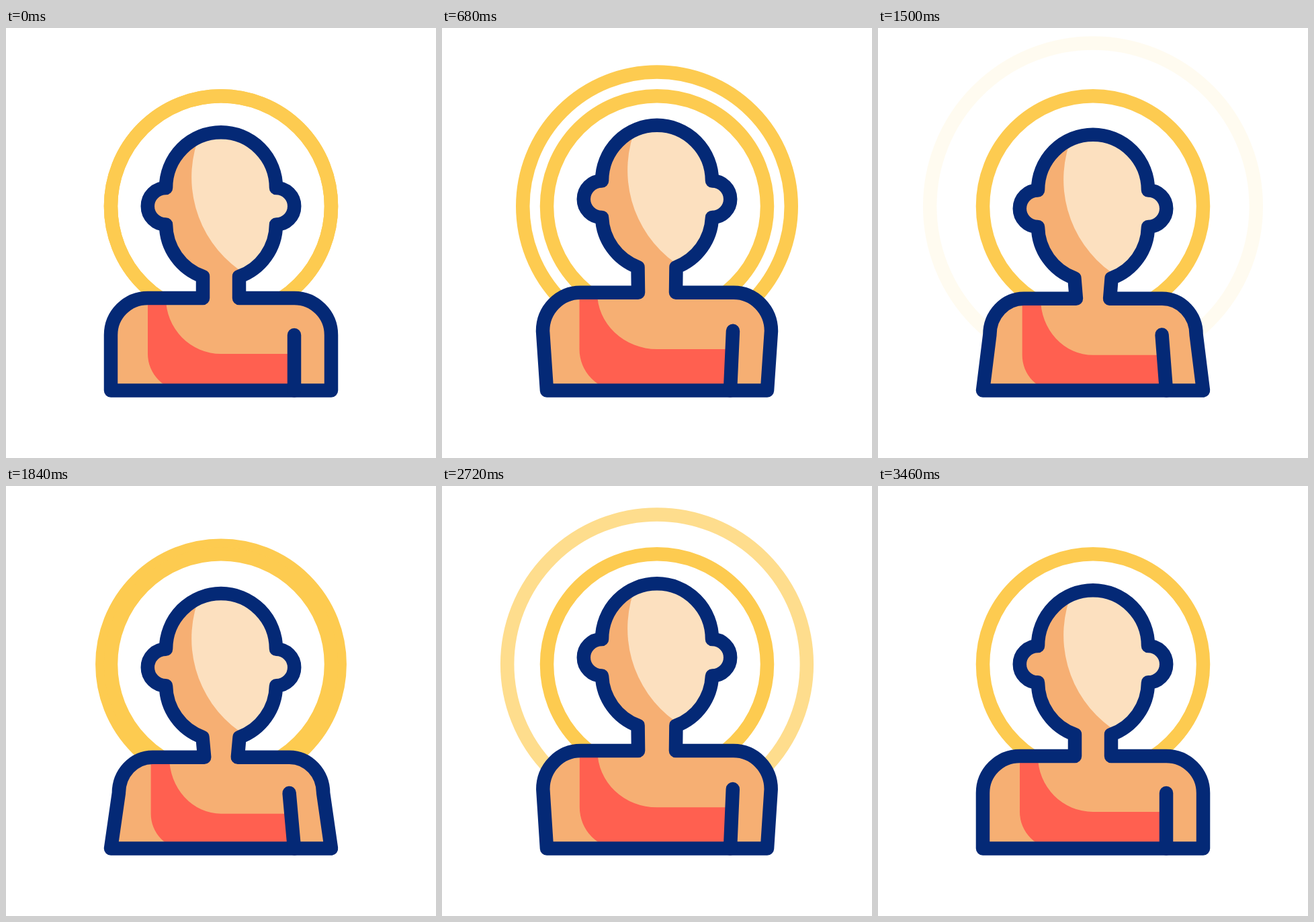
Write an HTML page with a canvas that moves like this. It is 640 by 640 pixels and loops after 3.6 s.

```html
<!DOCTYPE html>
<html lang="en">
<head>
<meta charset="utf-8">
<title>Breathing</title>
<style>
  html, body { margin: 0; width: 100%; height: 100%; overflow: hidden; background: #fff; }
  canvas { display: block; }
</style>
</head>
<body>
<canvas id="stage" width="640" height="640"></canvas>
<script>
const ctx = document.getElementById('stage').getContext('2d');
const LOOP = 3600, RING_CYCLE = 1600, LINE = 20.5;
const NAVY = '#042976', YELLOW = '#fdcb50', SKIN = '#f6af73', LIGHT = '#fce0bf', RED = '#ff6050';

// head shift, neck top x y, neck base x y, shoulder x, side x y, arm x y, sash x y, sash inner x
const REST   = [0, 293, 370, 293, 402, 211, 156, 457, 429, 457, 211, 485, 238];
const INHALE = [-10.4, 291.5, 356, 292, 393.7, 206, 150, 451, 433, 450.8, 204.5, 478, 231];
const EXHALE = [5.4, 292.5, 374.5, 295.3, 404, 218.5, 168.5, 457.3, 421.2, 457.2, 216, 488, 243.5];
const KEYS = [[0, REST], [660, INHALE], [1740, EXHALE], [2590, INHALE], [3500, REST], [LOOP, REST]];

const clamp = v => Math.min(1, Math.max(0, v));
const ease = u => (1 - Math.cos(Math.PI * u)) / 2;

function poseAt(t) {
  const i = KEYS.findIndex(([end]) => t < end);
  const [t0, from] = KEYS[i - 1], [t1, to] = KEYS[i];
  const e = ease((t - t0) / (t1 - t0));
  return from.map((v, k) => v + (to[k] - v) * e);
}

function ring(radius, alpha = 1) {
  ctx.globalAlpha = alpha;
  ctx.strokeStyle = YELLOW;
  ctx.beginPath();
  ctx.arc(320, 265.3, radius, 0, 2 * Math.PI);
  ctx.stroke();
  ctx.globalAlpha = 1;
}

function fill(path, color) {
  ctx.fillStyle = color;
  ctx.fill(path);
}

function person(t) {
  const [dy, topX, topY, neckX, neckY, shX, sideX, sideY, armX, armY, sashX, sashY, innerX] = poseAt(t);
  const mirror = x => 640 - x;
  const earTop = 238 + dy, earEnd = 292.4 + dy;
  const shoulder = `A${shX - sideX} ${sideY - neckY} 0 0 1`;

  const body = new Path2D(`M${neckX} ${neckY}L${topX} ${topY}
    A82.8 82.8 0 0 1 238 ${earEnd}A27.2 27.2 0 0 1 238 ${earTop}
    A82 82.8 0 0 1 402 ${earTop}A27.2 27.2 0 0 1 402 ${earEnd}
    A82.8 82.8 0 0 1 ${mirror(topX)} ${topY}L${mirror(neckX)} ${neckY}
    H${mirror(shX)}${shoulder} ${mirror(sideX)} ${sideY}
    L484 539.5H156L${sideX} ${sideY}${shoulder} ${shX} ${neckY}Z`);
  const sash = new Path2D(`M${sashX} ${neckY}V${sashY}
    A${266 - sashX} ${540 - sashY} 0 0 0 266 540H429L${armX} ${sashY}H320
    A${320 - innerX} ${sashY - neckY} 0 0 1 ${innerX} ${neckY}Z`);
  const face = new Path2D(`M290 ${155 + dy}A169.6 169.6 0 0 0 347 ${360 + dy}
    H445V${145 + dy}H290Z`);
  const arm = new Path2D(`M${armX} ${armY}L429 539.5`);

  fill(body, SKIN);
  ctx.save();
  ctx.clip(body);
  fill(sash, RED);
  fill(face, LIGHT);
  ctx.restore();
  ctx.strokeStyle = NAVY;
  ctx.stroke(body);
  ctx.stroke(arm);
}

function draw() {
  const t = performance.now() % LOOP;
  const ringTime = t % RING_CYCLE;
  ctx.clearRect(0, 0, 640, 640);
  ctx.lineWidth = LINE;
  ctx.lineCap = ctx.lineJoin = 'round';
  if (t < 2 * RING_CYCLE) ring(164 + ringTime * 0.0525, clamp((1560 - ringTime) / 680));
  ring(164);
  person(t);
  requestAnimationFrame(draw);
}
draw();
</script>
</body>
</html>
```
